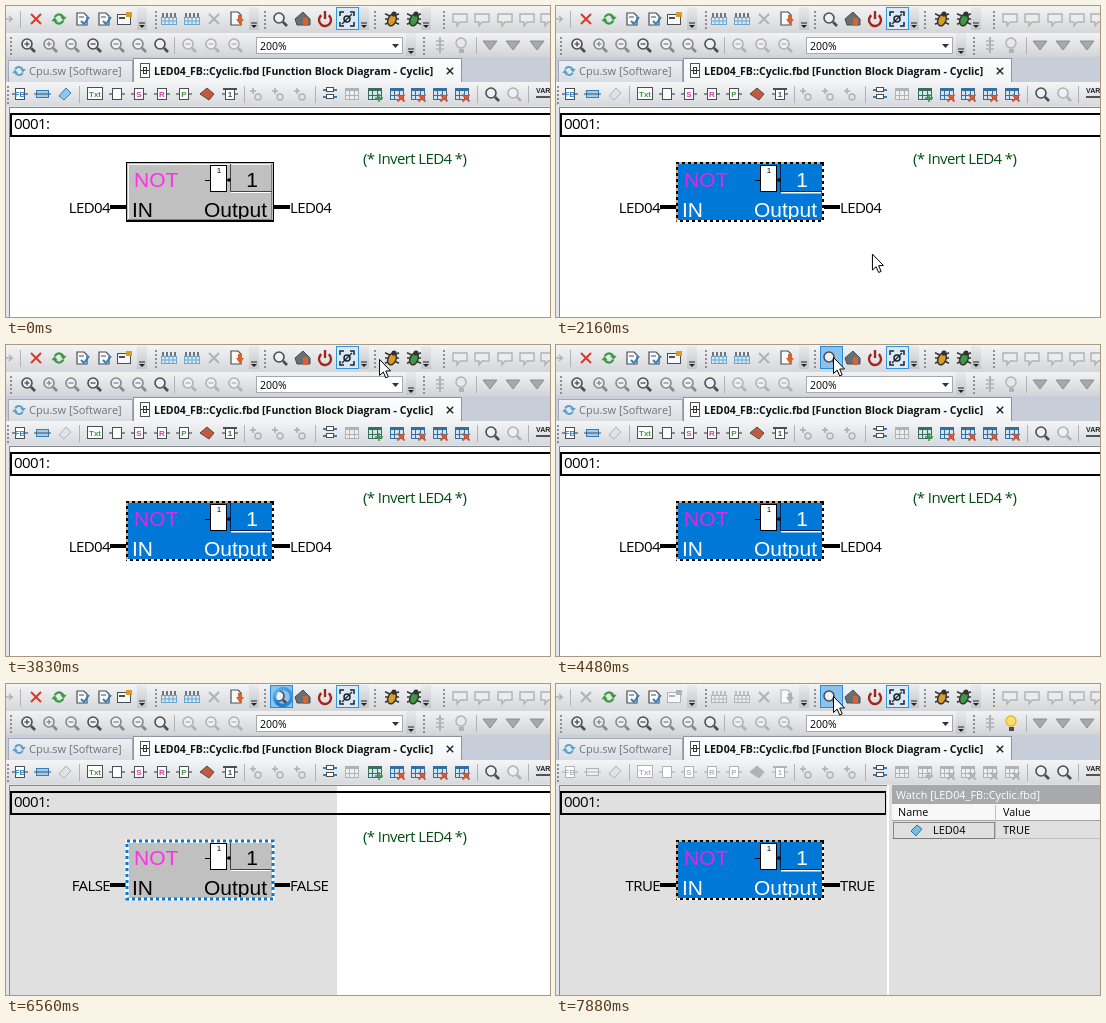
Animation of 544x311 px, one loop 8 s. Source, as an HTML page with a canvas:

```html
<!DOCTYPE html>
<html>
<head>
<meta charset="utf-8">
<style>
html, body { margin: 0; width: 544px; height: 311px; overflow: hidden; background: #fff; }
canvas { display: block; }
</style>
</head>
<body>
<canvas id="stage" width="544" height="311"></canvas>
<script>
const g = document.getElementById('stage').getContext('2d');
const SANS = '"Open Sans", "Noto Sans", sans-serif';
const ARIAL = '"Liberation Sans", Arial, sans-serif';
const OFF = '#b0b2b5', DARK = '#4a4d52', BLUE = '#2f7fc1', RED = '#d8392b',
  GREEN = '#3c9a46', ORANGE = '#dd9a22', SELECT = '#0078d7', PANE = '#e0e0e0';

// Cursor keyframes: time, x, y
const MOVES = [
  [450, 285, 311], [650, 273, 288], [900, 216, 236], [1160, 184, 208],
  [2030, 184, 208], [2130, 290, 238], [2240, 382, 272],
  [3100, 382, 273], [3370, 359, 251], [3580, 184, 90], [3720, 320, 30],
  [3800, 402, 16], [3890, 318, 10], [4060, 277, 12]
];

function rect(x, y, w, h, fill, edge) {
  if (fill) { g.fillStyle = fill; g.fillRect(x, y, w, h); }
  if (edge) { g.strokeStyle = edge; g.lineWidth = 1; g.strokeRect(x + .5, y + .5, w - 1, h - 1); }
}
function path(pts, edge, width = 1, fill) {
  g.beginPath();
  for (let i = 0; i < pts.length; i += 2) g.lineTo(pts[i], pts[i + 1]);
  if (fill) { g.closePath(); g.fillStyle = fill; g.fill(); }
  if (edge) { g.strokeStyle = edge; g.lineWidth = width; g.stroke(); }
}
function circle(x, y, r, edge, width = 1, fill, from = 0, to = 7) {
  g.beginPath();
  g.arc(x, y, r, from, to);
  if (fill) { g.fillStyle = fill; g.fill(); }
  if (edge) { g.strokeStyle = edge; g.lineWidth = width; g.stroke(); }
}
function text(s, x, y, size, color = '#000', family = SANS, style = '', align = 'left') {
  g.font = `${style} ${size}px ${family}`;
  g.fillStyle = color;
  g.textAlign = align;
  g.fillText(s, x, y);
}
// Editor labels are slightly heavy and closely set
function label(s, x, y, color = '#000', align = 'left') {
  g.letterSpacing = '-0.6px';
  text(s, x, y, 15, color, SANS, '500', align);
  g.letterSpacing = '0px';
}
function shade(x, y, w, h, top, bottom) {
  const f = g.createLinearGradient(0, y, 0, y + h);
  f.addColorStop(0, top);
  f.addColorStop(1, bottom);
  rect(x, y, w, h, f);
}

// Toolbar parts
function cross(x, y, c, r = 5, w = 2) {
  path([x - r, y - r, x + r, y + r], c, w);
  path([x - r, y + r, x + r, y - r], c, w);
}
function plus(x, y, c, r = 3) {
  path([x - r, y, x + r, y], c, 1.6);
  path([x, y - r, x, y + r], c, 1.6);
}
function lens(x, y, c = DARK, sign = '') {
  path([x + 3, y + 3, x + 7, y + 7], c, 2.6);
  circle(x - 1, y - 1, 5, c, 1.6, '#eef1f3');
  if (sign) path([x - 3.5, y - 1, x + 1.5, y - 1], c, 1.3);
  if (sign === '+') path([x - 1, y - 3.5, x - 1, y + 1.5], c, 1.3);
}
function sheet(x, y, edge, mark) {
  path([x - 5, y - 6, x + 2, y - 6, x + 5, y - 3, x + 5, y + 6, x - 5, y + 6], edge, 1.2, '#f8fafc');
  path([x - 3, y - 2, x + 2, y - 2], edge);
  path([x - 1, y + 2, x + 2, y + 5, x + 7, y - 2], mark, 2);
}
function cycle(x, y, c, r) {
  for (const turn of [0, Math.PI]) {
    g.save();
    g.translate(x, y);
    g.rotate(turn);
    circle(0, 0, r, c, r / 2, null, .4, 2.8);
    path([-r * 1.7, r * .5, -r * .3, r * .5, -r, -r * .4], null, 0, c);
    g.restore();
  }
}
function grid(x, y, c, mark) {
  rect(x - 7, y - 6, 14, 12, c === OFF ? '#eee' : '#cfe4f5', c);
  rect(x - 7, y - 6, 14, 3, c);
  path([x - 2.5, y - 5, x - 2.5, y + 6], c);
  path([x + 2.5, y - 5, x + 2.5, y + 6], c);
  path([x - 7, y + 1.5, x + 7, y + 1.5], c);
  if (mark === '+') plus(x + 4, y + 4, c === OFF ? OFF : GREEN, 4);
  if (mark === 'x') cross(x + 4, y + 4, c === OFF ? OFF : '#d9542b', 3.5, 2);
}
function build(x, y, on) {
  const c = on ? '#6aa5cf' : OFF;
  for (let i = -6; i < 7; i += 4) path([x + i, y - 6, x + i, y - 2], on ? DARK : OFF, 1.5);
  rect(x - 8, y - 2, 16, 8, on ? '#d5e9f7' : '#eee', c);
  for (let i = -4; i < 7; i += 4) path([x + i, y - 2, x + i, y + 6], c);
  path([x - 8, y + 2, x + 8, y + 2], c);
}
function chip(x, y, c, name, ink) {
  path([x - 8, y, x + 8, y], c, 1.2);
  rect(x - 5, y - 6, 10, 12, '#fff', c);
  text(name, x, y + 3, 8, ink, ARIAL, 'bold', 'center');
}
function bug(x, y, c) {
  for (const d of [-4, 0, 4]) path([x - 7, y + d * 1.3, x, y + d / 2, x + 7, y + d * 1.3], '#333', 1.5);
  g.beginPath();
  g.ellipse(x, y + 1, 4, 6, .4, 0, 7);
  g.fillStyle = c;
  g.fill();
  g.strokeStyle = '#333';
  g.stroke();
  circle(x + 2, y - 5, 2.6, null, 0, '#333');
}
function bubble(x, y) {
  path([x - 7, y - 5, x + 7, y - 5, x + 7, y + 3, x, y + 3, x - 3, y + 7, x - 3, y + 3, x - 7, y + 3, x - 7, y - 5], OFF, 1.4, '#ececec');
}
function grip(x, y) {
  for (let i = 0; i < 5; i++) rect(x, y - 8 + i * 4, 2, 2, '#8c8f94');
}
function overflow(x, y) {
  shade(x - 5, y - 12, 10, 23, '#e9eaec', '#c3c5c9');
  path([x - 3, y + 4, x + 3, y + 4], '#222', 1);
  path([x - 3, y + 6, x + 3, y + 6, x, y + 9], null, 0, '#222');
}
function separator(x, y) { rect(x, y - 8, 1, 17, '#afb2b7'); }

function topBar(s) {
  const y = 13, live = !s.locked, ink = live ? DARK : OFF;
  shade(0, 0, 544, 27, '#f4f4f5', '#d4d6d9');
  path([-2, y, 6, y, 3, y - 3, 6, y, 3, y + 3], OFF, 1.5);
  separator(14, y);
  cross(30, y, s.canDelete ? RED : OFF);
  cycle(53, y, GREEN, 4.5);
  sheet(76, y, DARK, BLUE);
  sheet(98, y, DARK, BLUE);
  rect(111, 8, 14, 11, '#f7f9fb', s.watch ? OFF : DARK);
  rect(113, 11, 6, 2, s.watch ? OFF : DARK);
  rect(120, 6, 6, 5, s.watch ? OFF : ORANGE);
  overflow(136, y);
  grip(149, y);
  build(163, y, live);
  build(186, y, live);
  cross(208, y, OFF);
  path([225, 6, 232, 6, 235, 9, 235, 19, 225, 19], ink, 1.2, '#f8fafc');
  path([230, 13, 238, 13, 234, 19], null, 0, live ? '#d9642b' : OFF);
  rect(232, 9, 4, 5, live ? '#d9642b' : OFF);
  overflow(248, y);
  grip(258, y);
  if (s.button) rect(264, 1, 23, 23, s.button, '#2a8ad4');
  lens(274, y);
  path([289, 13, 297, 6, 304, 13, 304, 19, 291, 19], DARK, 1, '#6b6d70');
  rect(297, 12, 5, 8, '#d9642b');
  circle(319, 14, 6, '#a3261c', 2.4, null, -.9, 4.05);
  path([319, 5, 319, 13], '#a3261c', 2.4);
  rect(330, 1, 23, 23, '#d8eafa', '#3295dc');
  for (const [a, b] of [[-1, -1], [1, -1], [-1, 1], [1, 1]])
    path([341 + a * 7, 13 + b * 3, 341 + a * 7, 13 + b * 7, 341 + a * 3, 13 + b * 7], '#222', 1.5);
  circle(341, 13, 3, '#222', 1.5);
  path([336, 18, 346, 8], '#222', 1.2);
  overflow(358, y);
  grip(368, y);
  bug(386, y, ORANGE);
  bug(408, y, GREEN);
  overflow(420, y);
  grip(437, y);
  for (const x of [454, 476, 499, 521, 542]) bubble(x, y);
}

function zoomBar(s) {
  const y = 39;
  shade(0, 27, 544, 24, '#f2f2f3', '#d2d4d7');
  grip(4, y);
  [22, 44, 66, 88, 111, 133, 155].forEach((x, i) =>
    lens(x, y, i % 3 ? '#85888c' : DARK, '++--- '[i] || ''));
  separator(168, y);
  for (const x of [183, 206, 229]) lens(x, y, OFF, '-');
  rect(250, 31, 147, 17, '#fff', '#a5a8ad');
  text('200%', 254, 44, 10.5);
  path([386, 38, 393, 38, 389.5, 42], null, 0, '#333');
  overflow(405, y);
  grip(417, y);
  path([434, 31, 434, 47], OFF, 2);
  for (const d of [-4, 0, 4]) path([430, y + d, 438, y + d], OFF, 1.5);
  circle(455, 37, 5, s.watch ? '#e8b72d' : OFF, 1.4, s.watch ? '#f9df70' : '#e5e8ec');
  rect(453, 43, 5, 4, s.watch ? DARK : OFF);
  separator(470, y);
  for (const x of [484, 507, 531]) path([x - 7, 35, x + 7, 35, x, 44], '#8b8e93', 1, '#a5a8ac');
}

function tabs() {
  rect(0, 51, 544, 26, '#c8ced9');
  shade(2, 54, 125, 22, '#eef0f3', '#d9dde3');
  rect(2, 54, 125, 23, null, '#a4abb6');
  cycle(13, 65, '#5b9fcb', 4);
  text('Cpu.sw [Software]', 23, 69, 11, '#6f757d');
  shade(127, 52, 329, 25, '#fff', '#f2f3f5');
  rect(127, 52, 329, 25, null, '#8c95a2');
  rect(134, 57, 10, 15, '#fff', '#555');
  rect(137, 61, 4, 7, '#fff', '#333');
  path([135, 64.5, 143, 64.5], '#333');
  text('LED04_FB::Cyclic.fbd [Function Block Diagram - Cyclic]', 148, 69, 10.55, '#111', SANS, 'bold');
  cross(444, 65, '#222', 3.2, 1.4);
}

function blockBar(s) {
  const y = 88, c = s.watch ? OFF : DARK, tint = k => s.watch ? OFF : k;
  shade(0, 76, 544, 24, '#f5f5f6', '#d6d9dd');
  grip(1, y);
  chip(14, y, c, 'FB', tint(BLUE));
  rect(30, 84, 13, 8, s.watch ? '#eee' : '#9fcdea', tint(BLUE));
  path([28, y, 45, y], c);
  path([53, 90, 60, 82, 65, 87, 58, 94], s.canErase ? BLUE : OFF, 1, s.canErase ? '#91c7ec' : '#dfe3e8');
  separator(73, y);
  rect(81, 81, 16, 13, '#fff', c);
  text('Txt', 89, 91, 8, tint(GREEN), ARIAL, 'bold', 'center');
  chip(111, y, c, '', c);
  chip(133, y, c, 'S', tint('#d23aa4'));
  chip(156, y, c, 'R', tint('#d23aa4'));
  chip(178, y, c, 'P', tint(GREEN));
  path([194, 88, 201, 82, 208, 88, 203, 94], c, 1, tint('#c4593b'));
  chip(224, y, c, '1', c);
  rect(217, 82, 14, 2, c);
  separator(238, y);
  for (const x of [249, 271, 293]) {
    plus(x - 2, y - 3, OFF, 3);
    circle(x + 3, y + 3, 3, OFF, 1.4);
  }
  separator(309, y);
  for (const d of [-4, 3]) {
    path([317, y + d, 331, y + d], BLUE, 2);
    rect(320, y + d - 3, 8, 5, '#fff', DARK);
  }
  grid(346, y, OFF);
  grid(369, y, tint('#3b6d59'), '+');
  [391, 412, 434, 456].forEach(x => grid(x, y, tint('#356f9f'), 'x'));
  separator(471, y);
  lens(486, y);
  lens(508, y, s.watch ? DARK : OFF);
  separator(522, y);
  text('VAR', 530, 87, 7, '#222', ARIAL, 'bold');
  path([530, 91, 544, 91], '#222', 1.5);
}

function block(s) {
  const blue = s.look === 'blue', ink = blue ? '#fff' : '#000';
  rect(104, 199, 16, 4, '#000');
  rect(268, 199, 16, 4, '#000');
  rect(120, 156, 148, 60, blue ? SELECT : '#c0c0c0');
  g.save();
  g.beginPath();
  g.rect(121, 157, 146, 56);
  g.clip();
  text('NOT', 128, 181, 21, blue ? '#e325e3' : '#ff30e8', ARIAL);
  text('IN', 126, 211, 21, ink, ARIAL);
  text('Output', 198, 211, 21, ink, ARIAL);
  g.restore();
  if (!blue) {
    path([122.5, 214, 122.5, 158.5, 266, 158.5], '#f4f4f4');
    path([122, 213.5, 265.5, 213.5, 265.5, 158], '#808080');
    path([225, 186.5, 265, 186.5], '#fff');
  } else path([225, 186.5, 265, 186.5], '#fff', 2);
  path([224.5, 158, 224.5, 185.5, 266, 185.5], blue ? '#00224a' : '#444');
  text('1', 246, 181, 21, ink, ARIAL, '', 'center');
  path([199, 174.5, 225, 174.5], '#000');
  rect(204, 159, 17, 27, '#fff', '#000');
  text('1', 213, 167, 8, '#000', ARIAL, '', 'center');
  circle(223, 174, 1.8, null, 0, '#000');

  if (s.look === 'plain') {
    rect(120, 156, 148, 60, null, '#000');
    path([120, 215, 268, 215], '#000', 2);
    return;
  }
  const frame = (edge, w) => {
    g.strokeStyle = edge;
    g.lineWidth = w;
    g.strokeRect(121, 157, 146, 58);
  };
  frame(blue ? '#000' : '#fff', blue ? 2 : 3);
  g.setLineDash([3, 3]);
  if (blue) {
    path([121, 215, 121, 157, 267, 157], '#e4a66b', 2);
    path([121, 215, 267, 215, 267, 157], '#fff', 2);
  } else frame(SELECT, 3);
  g.setLineDash([]);
}

function editor(s) {
  rect(0, 100, 544, 211, '#e3e5e9');
  rect(3, 101, 541, 210, '#fff');
  if (s.online) rect(3, 101, 328, 210, PANE);
  rect(3, 101, 541, 1, '#828790');
  rect(3, 101, 1, 210, '#828790');
  const end = s.watch ? 330 : 544;
  rect(4, 107, end - 4, 2, '#000');
  rect(4, 129, end - 4, 2, '#000');
  rect(4, 107, 2, 24, '#000');
  if (s.watch) rect(329, 107, 1, 24, '#000');
  label('0001:', 8, 123);
  label(s.value, 104, 207, '#000', 'right');
  label(s.value, 284, 207);
  if (!s.watch) label('(* Invert LED4 *)', 357, 158, '#004d12');
  block(s);
}

function watchPane(s) {
  rect(331, 100, 213, 211, PANE);
  rect(331, 101, 2, 210, '#fff');
  rect(336, 101, 208, 19, '#a7a9ad');
  text('Watch [LED04_FB::Cyclic.fbd]', 340, 115, 10.8, '#fff');
  rect(336, 120, 208, 17, '#f8f8f8');
  rect(336, 136, 208, 1, '#a5a5a5');
  rect(439, 121, 1, 34, '#c0c0c0');
  rect(336, 154, 208, 1, '#c0c0c0');
  text('Name', 342, 132, 10.8);
  text('Value', 447, 132, 10.8);
  g.setLineDash([1, 1]);
  rect(337, 138, 102, 17, null, '#333');
  g.setLineDash([]);
  path([355, 147, 361, 141, 366, 145, 360, 152], '#2b76a8', 1, '#7dbbe5');
  text('LED04', 377, 150, 11);
  text(s.value, 447, 150, 11);
}

function pointer(t) {
  let i = MOVES.findIndex(m => m[0] > t);
  if (i < 0) i = MOVES.length;
  if (!i) return;
  const a = MOVES[i - 1], b = MOVES[i] || a;
  const k = b === a ? 0 : (t - a[0]) / (b[0] - a[0]);
  g.save();
  g.translate(a[1] + (b[1] - a[1]) * k + .5, a[2] + (b[2] - a[2]) * k + .5);
  path([0, 0, 0, 16, 3.7, 12.6, 6.2, 18.4, 8.7, 17.3, 6.2, 11.6, 11, 11.4], '#000', 1, '#fff');
  g.restore();
}

function spinner(t) {
  const f = g.createConicGradient(t / 1000 * Math.PI * 2, 277, 13);
  f.addColorStop(0, '#5fb0e8');
  f.addColorStop(.8, '#1479d1');
  f.addColorStop(1, '#5fb0e8');
  circle(277, 13, 8.5, f, 3.5);
}

function draw(t) {
  const waiting = t >= 4680 && t < 7860;
  const state = {
    canDelete: (t < 1470 || t >= 1600) && t < 6860,
    canErase: t < 1830,
    locked: t >= 6860 || (t >= 4700 && t < 5440),
    online: t >= 6300,
    watch: t >= 6860,
    value: t < 6300 ? 'LED04' : t < 7690 ? 'FALSE' : 'TRUE',
    look: t < 1490 ? 'plain' : t >= 6300 && t < 7100 ? 'dashed' : 'blue',
    button: t >= 4380 ? '#8cc3ee' : t >= 3990 ? '#d8eafa' : null
  };
  topBar(state);
  zoomBar(state);
  tabs();
  blockBar(state);
  editor(state);
  if (state.watch) watchPane(state);
  if (waiting) spinner(t); else pointer(t);
}

function tick() {
  draw(performance.now() % 8000);
  requestAnimationFrame(tick);
}
tick();
</script>
</body>
</html>
```
